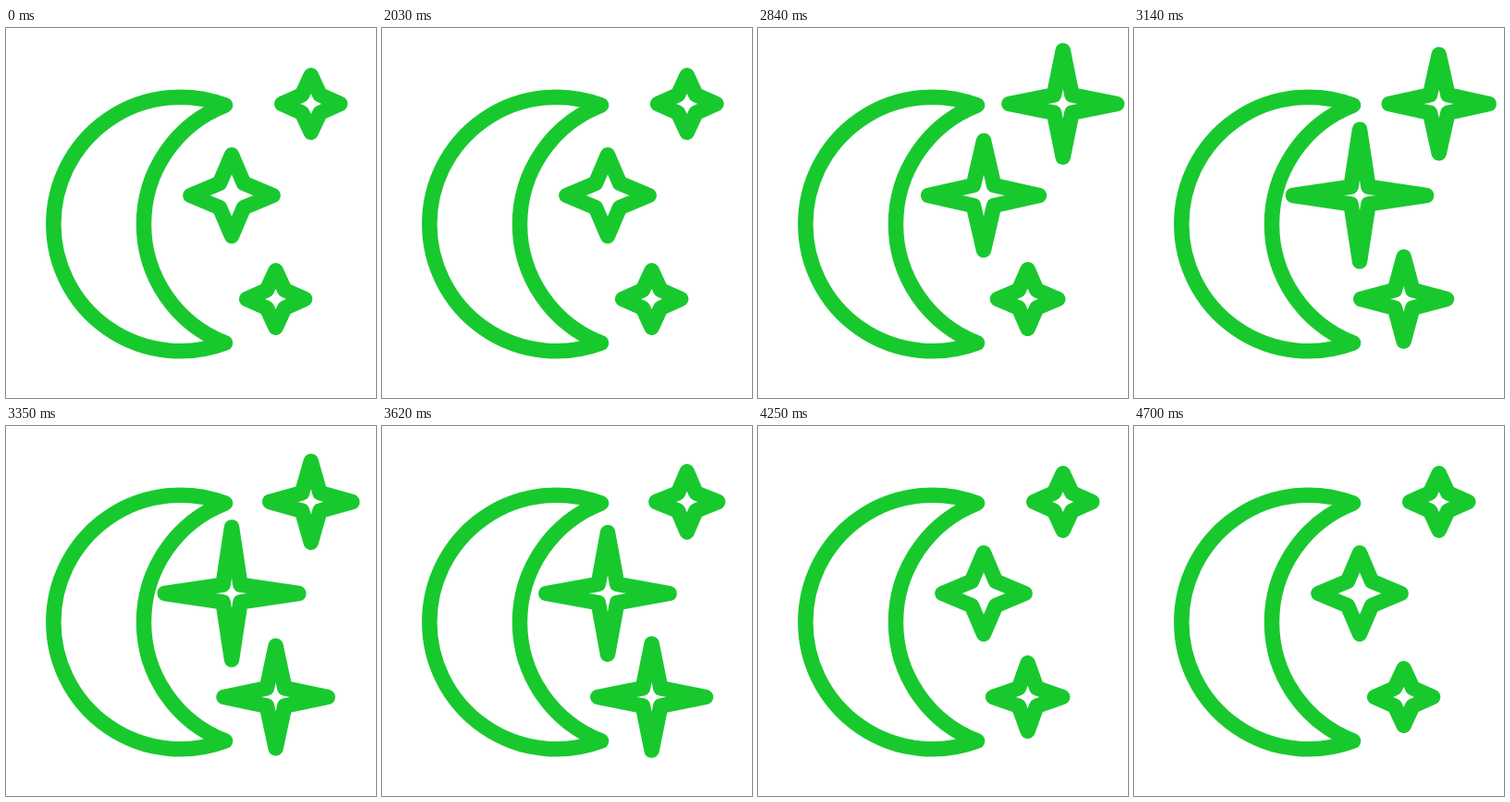
An HTML page for the animation above (5.03 s loop, 400 by 400 pixels).

```html
<!DOCTYPE html>
<html lang="en">
<head>
<meta charset="utf-8">
<title>Moon and stars</title>
<style>
  html, body { margin: 0; width: 100%; height: 100%; overflow: hidden; background: #fff; }
  svg { display: block; width: 100vw; height: 100vh; }
  path { fill: none; stroke: #18c92e; stroke-width: 16.5; stroke-linejoin: round; stroke-linecap: round; }
</style>
</head>
<body>
<svg viewBox="0 0 400 400">
  <path d="M237 83.5A137.3 137.3 0 1 0 237 340.5A137.8 137.8 0 0 1 237 83.5Z"/>
  <path class="star"/>
  <path class="star"/>
  <path class="star"/>
</svg>
<script>
  const LOOP = 5030, START = 2000, STEP = 30, LAST = 90;

  // reach: tip distance, waist: inner corner; each [at rest, stretched]
  const stars = [
    { x: 329.7, y: 82, delay: 0, reach: [31.5, 58.3], waist: [9.7, 9.7] },
    { x: 244, y: 181, delay: 15, reach: [44.6, 72.3], waist: [13.1, 9.4] },
    { x: 291.6, y: 293, delay: 25, reach: [31.5, 58.3], waist: [9.7, 9.7] }
  ];
  const paths = document.querySelectorAll('.star');

  const mix = ([a, b], k) => a + (b - a) * k;

  function ease(from, to, n) {
    const x = Math.min(1, Math.max(0, (n - from) / (to - from)));
    return x * x * (3 - 2 * x);
  }

  // Stretch out, hold briefly, return
  const twinkle = n => ease(0, 24.3, n) - ease(31, 58.5, n);

  function outline({ x, y, reach, waist }, k) {
    const rx = mix(reach, k), ry = rx - 0.8, w = mix(waist, k);
    const points = [[0, -ry], [w, -w], [rx, 0], [w, w], [0, ry], [-w, w], [-rx, 0], [-w, -w]];
    return 'M' + points.map(([dx, dy]) => `${x + dx} ${y + dy}`).join('L') + 'Z';
  }

  function draw(now) {
    const t = now % LOOP;
    const n = Math.min(LAST, Math.max(0, Math.floor((t - START) / STEP)));
    stars.forEach((s, i) => paths[i].setAttribute('d', outline(s, twinkle(n - s.delay))));
  }

  const begin = performance.now();
  function tick() {
    draw(performance.now() - begin);
    requestAnimationFrame(tick);
  }
  tick();
</script>
</body>
</html>
```
